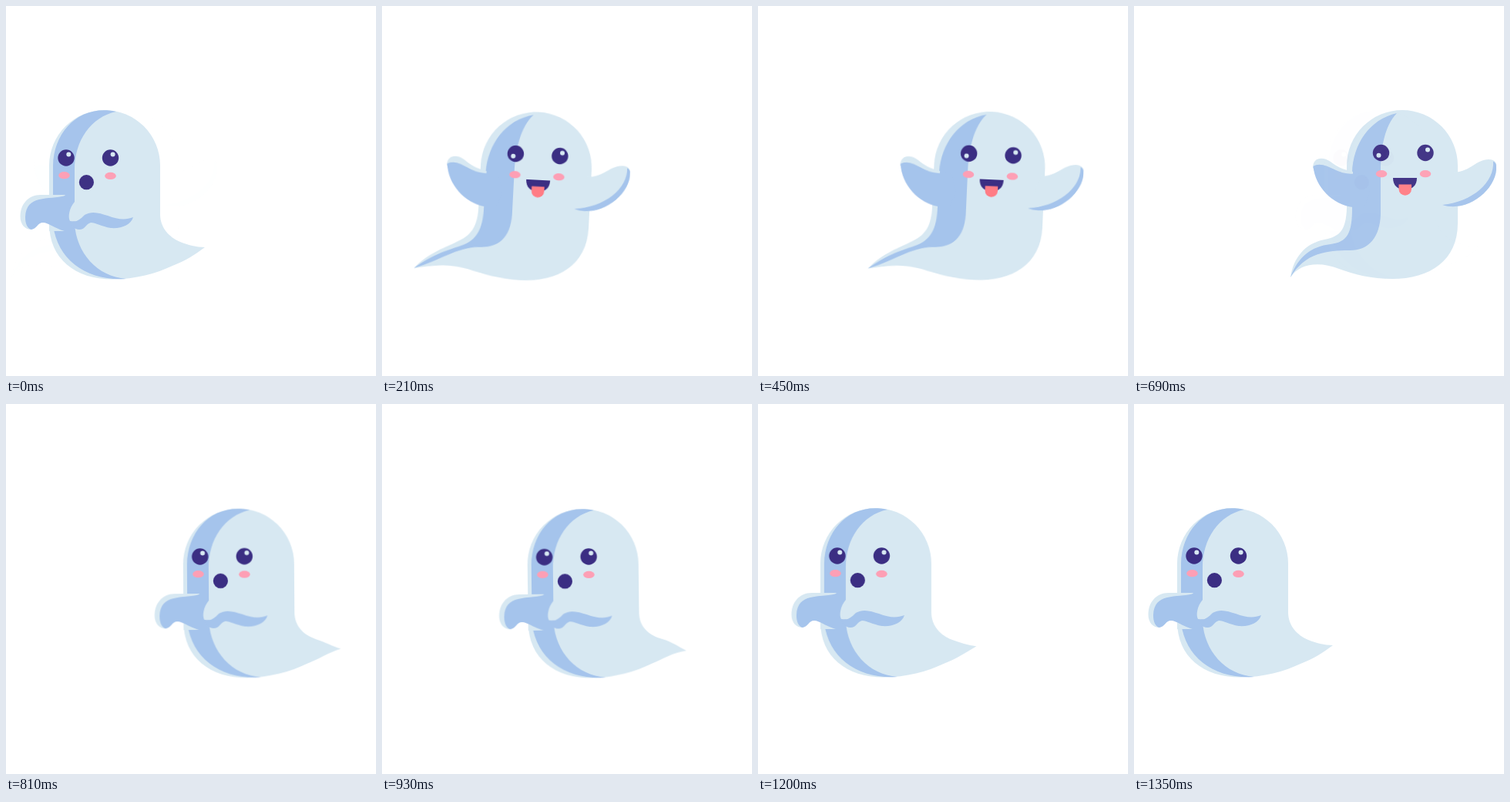
Recreate the animation shown at these times as an HTML page. Size 480 by 480 pixels, loop 1.38 s.

```html
<!DOCTYPE html>
<html lang="en">
<head>
<meta charset="utf-8">
<title>Floating ghost</title>
<style>
  html, body { margin: 0; width: 100%; height: 100%; overflow: hidden; background: #fff; }
  svg { display: block; width: 100%; height: 100%; }

  .light { fill: #d7e8f2; }
  .shade { fill: #a5c4ec; }
  .dark { fill: #3b2e83; }
  .cheek { fill: #fd9fb5; }
  .tongue { fill: #ff7c85; }

  g, path { animation: 1380ms linear infinite; }
  .tilt { transform-box: view-box; }

  /* Rightward trip: first half of the loop */
  #right { animation-name: show-right; }
  #right .go { animation-name: go-right; }
  #right .tilt { animation-name: tilt-right; transform-origin: 348px 245px; }
  #right .body { animation-name: body-right; }
  #right .fold { animation-name: fold-right; }

  /* Leftward trip: second half */
  #left { animation-name: show-left; }
  #left .go { animation-name: go-left; }
  #left .tilt { animation-name: tilt-left; transform-origin: 128px 245px; }
  #left .body { animation-name: body-left; }

  @keyframes show-right {
    0% { opacity: 0; }
    6%, 49.95% { opacity: 1; }
    56%, 100% { opacity: 0; }
  }
  @keyframes show-left {
    0% { opacity: 1; }
    6%, 49.95% { opacity: 0; }
    56%, 100% { opacity: 1; }
  }

  @keyframes go-right {
    0% { transform: translateX(-196px); animation-timing-function: cubic-bezier(.333, 0, .667, 1); }
    48.6%, 100% { transform: none; }
  }
  @keyframes go-left {
    0%, 30% { transform: none; }
    30.01% { transform: translateX(191px); }
    50% { transform: translateX(191px); animation-timing-function: cubic-bezier(.333, 0, .667, 1); }
    97.826%, 100% { transform: none; }
  }

  @keyframes tilt-right {
    0% { transform: translateY(0) rotate(0deg); animation-timing-function: ease-in-out; }
    15.217% { transform: translateY(2.5px) rotate(3deg); }
    32.609% { transform: translateY(2px) rotate(2.6deg); animation-timing-function: ease-in-out; }
    48.6%, 100% { transform: translateY(0) rotate(0deg); }
  }
  @keyframes tilt-left {
    0%, 50% { transform: translateY(0) rotate(0deg); animation-timing-function: ease-in-out; }
    66% { transform: translateY(1.1px) rotate(-.7deg); animation-timing-function: ease-in-out; }
    80%, 100% { transform: translateY(0) rotate(0deg); }
  }

  @keyframes body-right {
    0%, 48.6%, 100% {
      d: path("M276 207A72 72 0 0 1 420 207V282C420 330 384 354 335 354C308 354 285 348 266 341C240 331 215 334 203 352C207 326 222 308 247 303C268 299 275 290 276 262Z");
      animation-timing-function: ease-in-out;
    }
    15.217%, 32.609% {
      d: path("M276 207A72 72 0 0 1 420 207V282C420 330 384 354 335 354C308 354 285 348 266 343C240 337 220 341 196.5 345.5C215 324 236 317 253 307C270 298 276 285 276 262Z");
      animation-timing-function: ease-in-out;
    }
  }
  @keyframes fold-right {
    0%, 48.6%, 100% {
      d: path("M341 139C325 155 320 185 320 215V270C319 300 305 317 280 317C250 317 222 320 203 352C213 325 230 312 255 309C277 306 283 295 283 262V216C284 180 305 147 341 139Z");
      animation-timing-function: ease-in-out;
    }
    15.217%, 32.609% {
      d: path("M341 139C325 155 320 185 320 215V270C319 300 305 314 278 314C250 316 230 334 196.5 345.5C222 325 240 320 259 312C279 303 283 285 283 262V216C284 180 305 147 341 139Z");
      animation-timing-function: ease-in-out;
    }
  }
  @keyframes body-left {
    0%, 50%, 97.826%, 100% {
      d: path("M56 207A72 72 0 0 1 200 207V270C200 288 212 300 226 306C236 310 247 313 258 313C246 322 232 331 216 337C195 347 168 354.5 138 354.5C90 354.5 56 328 56 282Z");
      animation-timing-function: ease-in-out;
    }
    66% {
      d: path("M56 207A72 72 0 0 1 200 207V270C200 290 213 300 230 305C243 309 250 315 261 321C242 323 232 330 215 337C195 347 165 354.5 138 354.5C90 354.5 56 328 56 282Z");
      animation-timing-function: ease-out;
    }
  }
</style>
</head>
<body>
<svg viewBox="0 0 480 480">
  <g id="right"><g class="go"><g class="tilt">
    <path class="light body" d="M276 207A72 72 0 0 1 420 207V282C420 330 384 354 335 354C308 354 285 348 266 341C240 331 215 334 203 352C207 326 222 308 247 303C268 299 275 290 276 262Z"/>
    <path class="shade fold" d="M341 139C325 155 320 185 320 215V270C319 300 305 317 280 317C250 317 222 320 203 352C213 325 230 312 255 309C277 306 283 295 283 262V216C284 180 305 147 341 139Z"/>

    <path class="light" d="M232 210C232 196 245 195 255 202C263 208 270 212 284 215V235H250Z"/>
    <path class="shade" d="M232.5 208C240 203 250 207 262 213C275 219 285 218 299 217L306 240L299 261H284C258 258 235 235 232.5 208Z"/>
    <path class="light" d="M415 216C438 214 444 199 460 199C468 199 471 204 470 208C472 236 434 269 400 258Z"/>
    <path class="shade" d="M466 201.5C469 203 470 205 470 208C472 236 434 269 400 258C440 254 468 228 466 201.5Z"/>

    <circle class="dark" cx="320.5" cy="190.5" r="10.7"/>
    <circle class="dark" cx="378" cy="190.5" r="10.7"/>
    <circle class="light" cx="317.5" cy="193.7" r="3"/>
    <circle class="light" cx="381" cy="186.5" r="3"/>
    <ellipse class="cheek" cx="321" cy="217.7" rx="7.3" ry="4.6"/>
    <ellipse class="cheek" cx="378" cy="217.7" rx="7.3" ry="4.6"/>
    <path class="dark" d="M336 223H367C367 233 361 238 351.5 238C342 238 336 233 336 223Z"/>
    <path class="tongue" d="M343.5 231.5H360V237.5A8.25 8.25 0 0 1 343.5 237.5Z"/>
  </g></g></g>

  <g id="left"><g class="go"><g class="tilt">
    <path class="light body" d="M56 207A72 72 0 0 1 200 207V270C200 288 212 300 226 306C236 310 247 313 258 313C246 322 232 331 216 337C195 347 168 354.5 138 354.5C90 354.5 56 328 56 282Z"/>
    <path class="shade" d="M143 137C110 144 89 175 89 212V282C91 320 118 351 156 354C105 357 67 330 61 284V207C62 162 96 127 143 137Z"/>

    <path class="light" d="M56 280H72L77 292H56Z"/>
    <path class="light" d="M77 245H45C28 245 18.5 258 18.5 273C18.5 284 25 290 33 290L60 265Z"/>
    <path class="shade" d="M77 246C55 252 26 244 25 274C25 283 28 289 33 290C40 289 41 281 48 281C55 281 62 288 76 292H89V246Z"/>
    <path class="light" d="M89 254C82 262 80 274 83 279C92 281 96 277 104 270V250H89Z"/>
    <path class="shade" d="M83 279C92 281 96 277 102 271C112 265 122 269 132 272C145 277 155 278 165 274C162 284 150 289 136 288C124 286 116 281 110 281C103 283 103 290 95 290C88 290 84 284 83 279Z"/>

    <circle class="dark" cx="78" cy="197" r="10.7"/>
    <circle class="dark" cx="135.5" cy="197" r="10.7"/>
    <circle class="light" cx="81.3" cy="192.6" r="3"/>
    <circle class="light" cx="138.6" cy="192.6" r="3"/>
    <ellipse class="cheek" cx="75.5" cy="219.7" rx="7.3" ry="4.6"/>
    <ellipse class="cheek" cx="135.5" cy="220.4" rx="7.3" ry="4.6"/>
    <circle class="dark" cx="104.4" cy="228.7" r="9.6"/>
  </g></g></g>
</svg>
</body>
</html>
```
